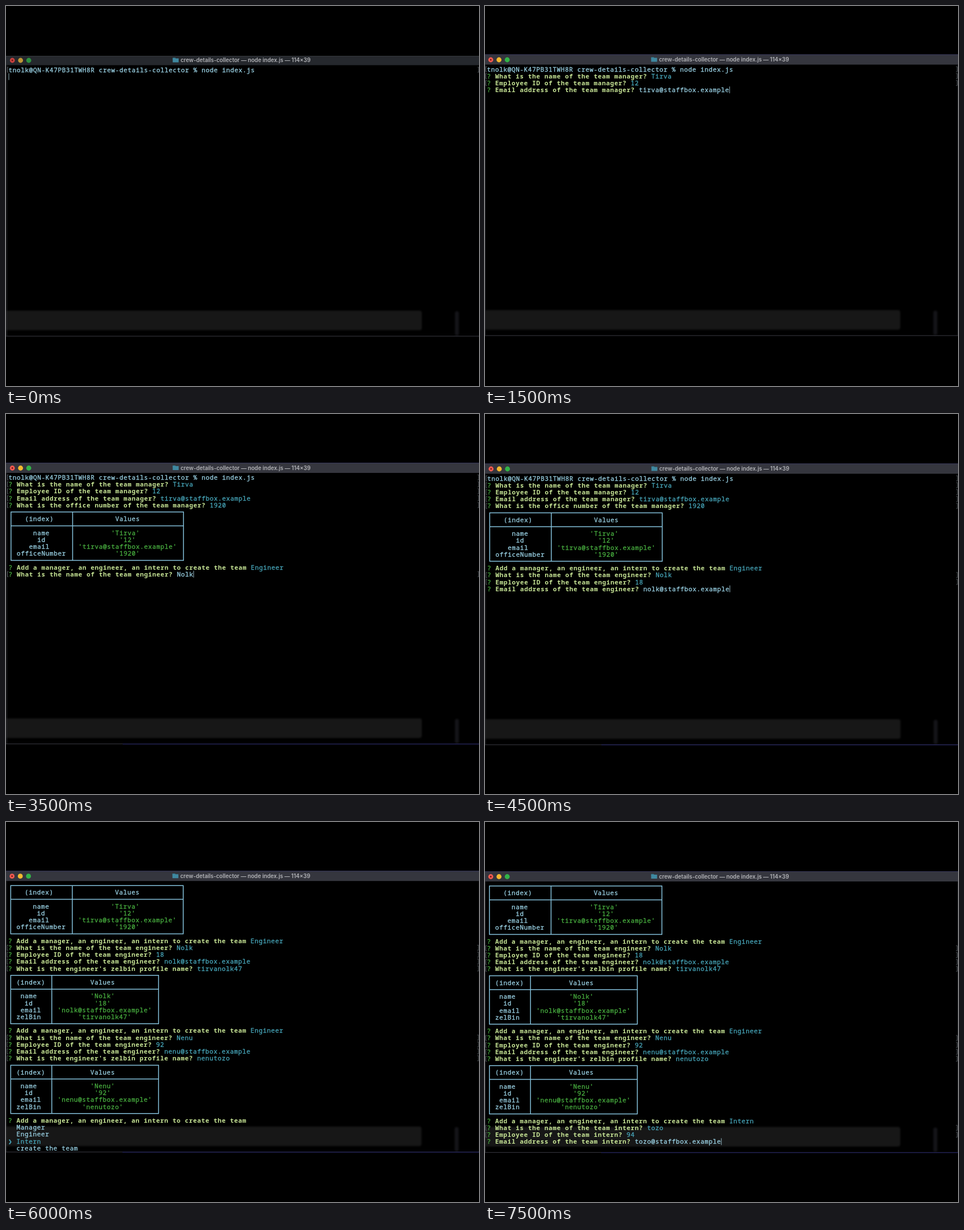
Animation, 835 px wide and 671 px high, one loop 8 s. Source, as an HTML page with a canvas:

```html
<!DOCTYPE html>
<html lang="en">
<head>
<meta charset="utf-8">
<title>Terminal session</title>
<style>
  html, body { margin: 0; width: 100%; height: 100%; overflow: hidden; background: #000; }
  canvas { display: block; }
</style>
</head>
<body>
<canvas id="stage" width="835" height="671"></canvas>
<script>
const ctx = document.getElementById('stage').getContext('2d');
const CELL = 7.25, ROW = 12.2, LEFT = 3.4, TOP = 112, TICK = 500;
const MONO = '11px "Noto Sans Mono", "DejaVu Sans Mono", monospace';
const LIGHT = '#9bd3e6', CYAN = '#48a8bc', GREEN = '#49b040', ASK = '#c8e696', DIM = '#435259', LINE = '#84c0da';
const PROJECT = 'crew-details-collector';
const PROMPT = `tnolk@QN-K47PB31TWH8R ${PROJECT} % node index.js`;
const MENU = ['Manager', 'Engineer', 'Intern', 'create the team'];

// Each person is asked four questions; a table and a menu follow.
function person(role, name, id, key, question, extra) {
  const email = name.toLowerCase() + '@staffbox.example';
  return {
    asks: [
      [`What is the name of the team ${role}?`, name],
      [`Employee ID of the team ${role}?`, id],
      [`Email address of the team ${role}?`, email],
      [question, extra]
    ],
    record: { name, id, email, [key]: extra }
  };
}
const zelbin = "What is the engineer's zelbin profile name?";
const people = [
  person('manager', 'Tirva', '12', 'officeNumber', 'What is the office number of the team manager?', '1920'),
  person('engineer', 'Nolk', '18', 'zelBin', zelbin, 'tirvanolk47'),
  person('engineer', 'Nenu', '92', 'zelBin', zelbin, 'nenutozo'),
  person('intern', 'tozo', '94', '', '', '')
];
const picks = [1, 1, 2];

// Per tick: active step (five per person, the fifth is the menu) and camera shake.
const ticks = [
  [-1, 1, .5], [0, 0, -.5], [1, 0, -.5], [2, 0, -.5],
  [3, 0, .5], [4, -.5, .5], [4, 0, 0], [5, 1, 0],
  [6, .5, 1.5], [7, .5, 1.5], [8, .5, .5], [12, .5, .3],
  [14, .5, .2], [15, 0, 1], [16, 0, 1], [17, 0, 1]
];

let row;
const rowY = r => TOP + r * ROW;

function box(x, y, w, h, color) {
  ctx.fillStyle = color;
  ctx.fillRect(x, y, w, h);
}

function put(text, col, color, bold, r = row) {
  if (r < 0) return;
  ctx.font = (bold ? 'bold ' : '') + MONO;
  ctx.letterSpacing = '0px';
  ctx.letterSpacing = CELL - ctx.measureText('0').width + 'px';
  ctx.fillStyle = ctx.strokeStyle = color;
  const x = LEFT + col * CELL, y = rowY(r) + 4;
  ctx.fillText(text, x, y);
  // A hairline outline gives the regular face its medium weight.
  ctx.lineWidth = .3;
  if (!bold) ctx.strokeText(text, x, y);
}

function brackets() {
  if (row < 0) return;
  ctx.strokeStyle = '#4b5055';
  ctx.lineWidth = 1;
  for (const [x, w] of [[1.5, 2], [833.5, -2]]) {
    ctx.beginPath();
    ctx.moveTo(x + w, rowY(row) - 4.5);
    ctx.lineTo(x, rowY(row) - 4.5);
    ctx.lineTo(x, rowY(row) + 4.5);
    ctx.lineTo(x + w, rowY(row) + 4.5);
    ctx.stroke();
  }
}

function cursor(col) {
  box(LEFT + col * CELL, rowY(row) - 6, 1.2, 12, '#7d99a3');
}

function ask([question, answer], done, marked) {
  if (marked) brackets();
  put('?', 0, GREEN);
  put(question, 2, ASK, true);
  const col = question.length + 3;
  put(answer, col, done ? CYAN : LIGHT);
  if (!done) cursor(col + answer.length);
  row++;
}

function table(record) {
  const cells = Object.entries(record).map(([k, v]) => [k, `'${v}'`]);
  const rows = [['(index)', 'Values'], ...cells];
  const widths = [0, 1].map(i => Math.max(...rows.map(c => c[i].length)) + 2);
  const edges = [0, widths[0] + 1, widths[0] + widths[1] + 2];
  const xs = edges.map(c => LEFT + (c + .5) * CELL + .8);
  const ys = [row, row + 2, row + 7].map(rowY);

  ctx.strokeStyle = LINE;
  ctx.lineWidth = 1.5;
  ctx.beginPath();
  for (const y of ys) { ctx.moveTo(xs[0] - .7, y); ctx.lineTo(xs[2] + .7, y); }
  for (const x of xs) { ctx.moveTo(x, ys[0]); ctx.lineTo(x, ys[2]); }
  ctx.stroke();

  rows.forEach((pair, n) => pair.forEach((text, i) => {
    const col = edges[i] + 1 + Math.floor((widths[i] - text.length) / 2);
    put(text, col, n && i ? GREEN : LIGHT, false, row + 1 + n + (n ? 1 : 0));
  }));
  row += 8;
}

function menu(pick, done, hint) {
  const question = 'Add a manager, an engineer, an intern to create the team';
  put('?', 0, GREEN);
  put(question, 2, ASK, true);
  if (done) put(MENU[pick], question.length + 3, CYAN);
  if (hint) put('(Use arrow keys)', question.length + 3, DIM);
  row++;
  if (done) return;
  MENU.forEach((item, i) => {
    if (i === pick) put('❯', 0, CYAN);
    put(item, 2, i === pick ? CYAN : LIGHT);
    row++;
  });
}

function session(step, hint) {
  row = step < 14 ? 0 : -5;
  brackets();
  put(PROMPT, 0, LIGHT);
  row++;
  if (step < 0) cursor(0);
  for (let i = 0; i <= step; i++) {
    const p = Math.floor(i / 5), done = i < step;
    if (i % 5 < 4) {
      ask(people[p].asks[i % 5], done, done || i % 5 === 0);
    } else {
      table(people[p].record);
      menu(hint ? 0 : picks[p], done, hint);
    }
  }
}

function windowFrame(muted) {
  const top = muted ? 87.5 : 86;
  box(-2, top, 840, 104 - top, muted ? '#25282d' : '#35363e');
  box(-2, top, 840, 1, muted ? '#34373c' : '#36365a');
  box(0, 104, 1, 478, '#25262b');
  box(834, 104, 1, 478, '#1c1d21');
  box(-2, 581.9, 840, 1.2, '#303038');

  const lights = muted ? ['#c9423f', '#bf9636', '#2d9140'] : ['#f05a50', '#f2b82f', '#32b348'];
  lights.forEach((color, i) => {
    ctx.fillStyle = color;
    ctx.beginPath();
    ctx.arc(10.2 + i * 14.5, 95.5, 4.4, 0, 7);
    ctx.fill();
  });
  ctx.fillStyle = '#6b1714';
  ctx.beginPath();
  ctx.arc(10.2, 95.5, 1.4, 0, 7);
  ctx.fill();

  box(293.3, 90.8, 5, 3, '#34798f');
  box(293.3, 92, 10.5, 7, '#3f88a0');

  ctx.letterSpacing = '0px';
  ctx.font = '600 9.7px Inter, "Liberation Sans", sans-serif';
  ctx.fillStyle = '#b3b4b8';
  ctx.fillText(`${PROJECT} — node index.js — 114×39`, 307.2, 98.6);
}

function shade(x, y, w, h, color) {
  ctx.save();
  ctx.filter = 'blur(1.8px)';
  ctx.fillStyle = color;
  ctx.beginPath();
  ctx.roundRect(x, y, w, h, 4);
  ctx.fill();
  ctx.restore();
}

function draw(now) {
  const n = Math.floor(now / TICK) % ticks.length;
  const [step, dx, dy] = ticks[n];
  ctx.setTransform(1, 0, 0, 1, 0, 0);
  box(0, 0, 835, 671, '#000');
  ctx.translate(dx, dy);
  shade(-8, 537.5, 741, 34.5, '#171717');
  shade(791.5, 538.5, 7, 43, '#141418');
  windowFrame(n === 0);
  if (n > 4) box(205, 582.2, 640, 1.2, '#1e1e5a');
  session(step, n === 5);
}

const start = performance.now();
function loop() {
  draw(performance.now() - start);
  requestAnimationFrame(loop);
}
loop();
</script>
</body>
</html>
```
